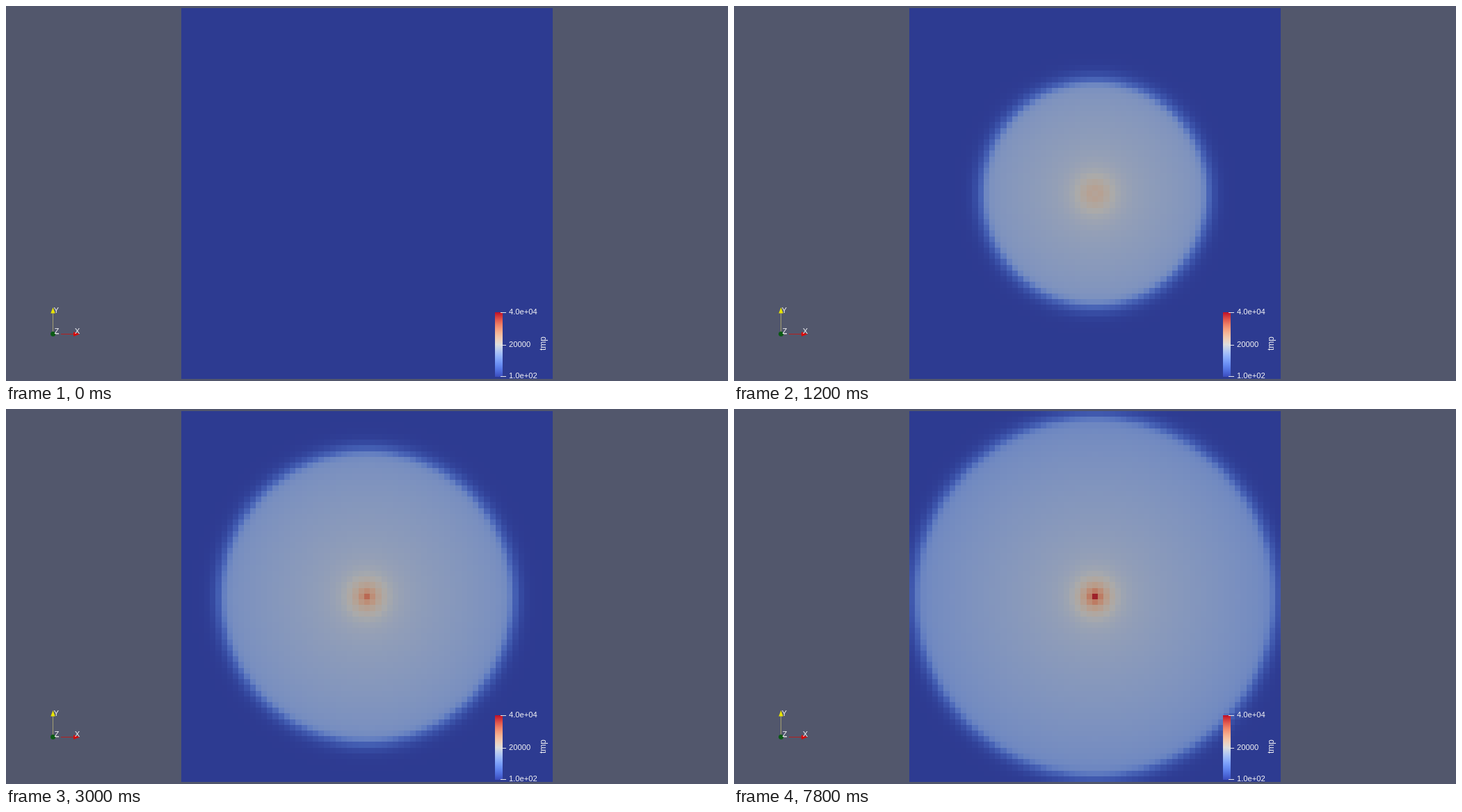
Recreate the animation shown at these times as an HTML page with a canvas. Size 1038 px wide and 540 px high, loop 8 s.

```html
<!DOCTYPE html>
<html lang="en">
<head>
<meta charset="utf-8">
<title>Expanding temperature front</title>
<style>
  html, body { margin: 0; width: 100%; height: 100%; overflow: hidden; background: #52576c; }
  canvas, svg { position: absolute; left: 0; top: 0; width: 1038px; height: 540px; }
  text { font-family: "Liberation Sans", Arial, sans-serif; font-size: 11.2px; fill: #f2f2f4; }
</style>
</head>
<body>
<canvas id="field" width="1038" height="540"></canvas>
<svg viewBox="0 0 1038 540">
  <defs><linearGradient id="scale" x1="0" y1="1" x2="0" y2="0"></linearGradient></defs>

  <path d="M67.5 472V442" stroke="#a39f72"/>
  <path d="M67.5 434L70.7 442.5H64.3Z" fill="#e8e400"/>
  <path d="M71 472.5H76" stroke="#a0a0a4"/>
  <path d="M79 472.5H98" stroke="#b3201f"/>
  <path d="M106 472.5L97 469.2V475.8Z" fill="#d80a0a"/>
  <circle cx="67.6" cy="472.3" r="3.5" fill="#0a5a14"/>
  <text x="68.6" y="442">Y</text>
  <text x="69.6" y="471.5">Z</text>
  <text x="98.8" y="472.4">X</text>

  <rect x="703" y="441" width="11" height="93" fill="url(#scale)"/>
  <path d="M711 441.5H719M711 488.5H719M711 533.5H719" stroke="#e6e6ea"/>
  <text x="723" y="444">4.0e+04</text>
  <text x="723" y="491">20000</text>
  <text x="723" y="536">1.0e+02</text>
  <text transform="translate(775.5 496) rotate(-90)" style="font-size:12px">tmp</text>
</svg>
<script>
const LOOP = 8000, STEP = 200, CELLS = 65, LEFT = 252, TOP = 3, SIZE = 534;
const pitch = SIZE / CELLS, mid = (CELLS - 1) / 2, shade = 0.77;
const ctx = document.getElementById('field').getContext('2d');

// Diverging colour map: one quadratic curve on each side of grey
const cool = [59, 76, 188], coolPull = [106, 170, 294], grey = [221, 221, 221],
  warmPull = [283, 191, 116], warm = [190, 14, 40];

function color(v, light = 1) {
  const u = Math.max(0, Math.min(1, v)) * 2;
  const [a, b, c] = u < 1 ? [cool, coolPull, grey] : [grey, warmPull, warm];
  const t = u < 1 ? u : u - 1, s = 1 - t;
  return `rgb(${a.map((x, k) => Math.round((s * s * x + 2 * s * t * b[k] + t * t * c[k]) * light))})`;
}

// The heated volume saturates exponentially
const frontRadius = n => Math.cbrt(24.2e6 * (1 - Math.exp(-n / 30.5)));

function heat(r, n, edge) {
  if (n === 0) return 0;
  const d = r - edge;
  const settled = .455 - .0005 * r + .52 * Math.exp(-r / 14);
  const warming = .72 * Math.exp(-r / 9 - n / 11);
  const cooling = .025 * Math.exp(Math.min(0, d) / 25);
  const inside = 1 / (1 + Math.exp(d / (d < 0 ? 3.5 : 6.5)));
  return (settled - warming - cooling) * inside;
}

function draw(n) {
  const edge = frontRadius(n);
  for (let j = 0; j < CELLS; j++) {
    const y = Math.round(TOP + j * pitch), h = Math.round(TOP + (j + 1) * pitch) - y;
    for (let i = 0; i < CELLS; i++) {
      const x = Math.round(LEFT + i * pitch), w = Math.round(LEFT + (i + 1) * pitch) - x;
      ctx.fillStyle = color(heat(Math.hypot(i - mid, j - mid) * pitch, n, edge), shade);
      ctx.fillRect(x, y, w, h);
    }
  }
}

const scale = document.getElementById('scale');
for (let v = 0; v <= 1; v += 1 / 16) {
  const stop = document.createElementNS('http://www.w3.org/2000/svg', 'stop');
  stop.setAttribute('offset', v);
  stop.setAttribute('stop-color', color(v));
  scale.append(stop);
}

const start = performance.now();
let shown = -1;
function tick() {
  const n = Math.floor((performance.now() - start) % LOOP / STEP);
  if (n !== shown) draw(shown = n);
  requestAnimationFrame(tick);
}
tick();
</script>
</body>
</html>
```
